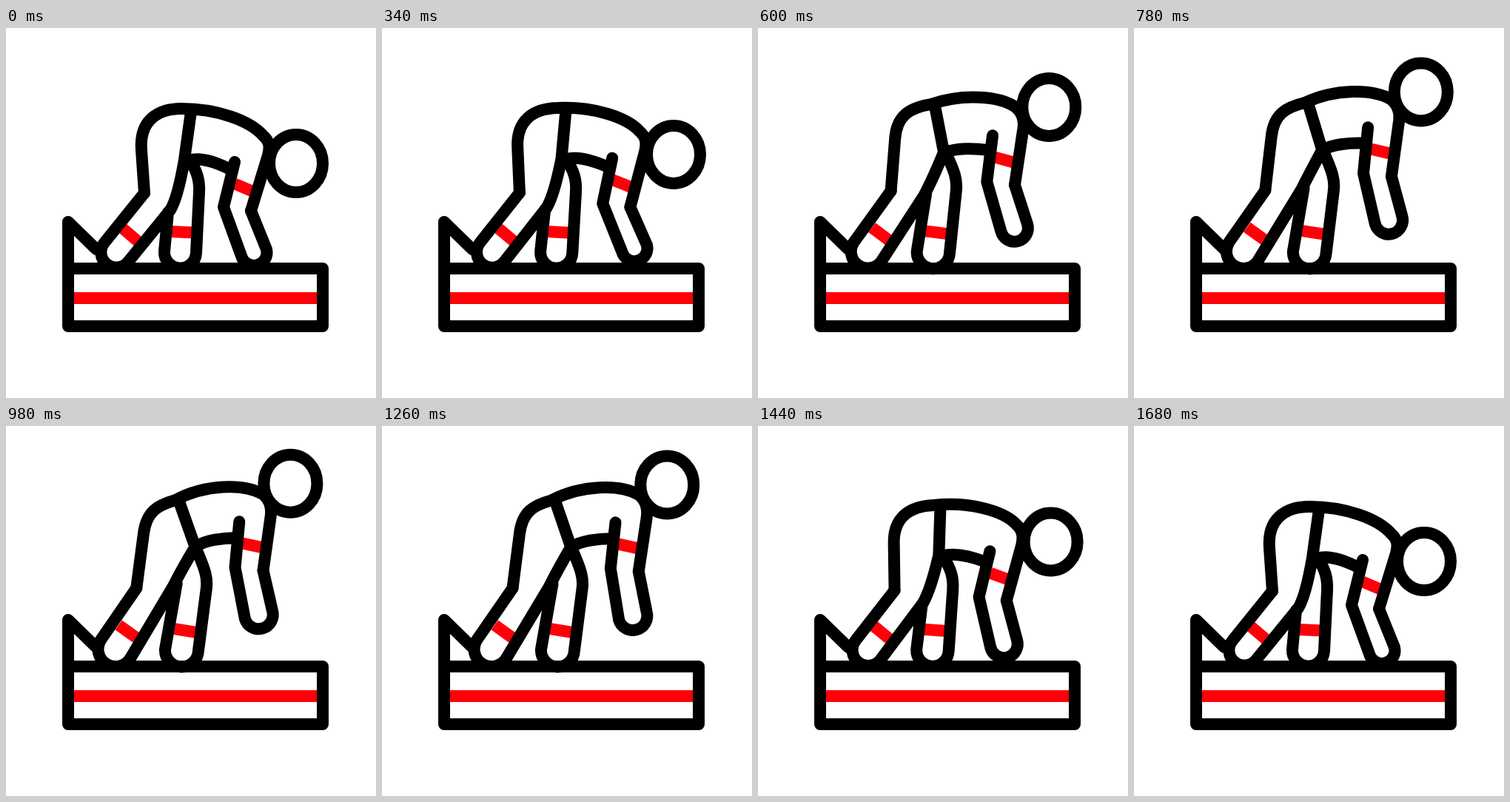
Write an HTML page that moves like this. It is 500 px wide and 500 px high and loops after 2 s.

```html
<!DOCTYPE html>
<html>
<head>
<meta charset="utf-8">
<title>Sprinter on the starting block</title>
<style>
  html, body { margin: 0; width: 100%; height: 100%; overflow: hidden; background: #fff; }
  svg { display: block; width: 100vw; height: 100vh; }
  path, ellipse { fill: none; stroke: #000; stroke-width: 16; stroke-linecap: round; stroke-linejoin: round; }
  .band { stroke: #ff0009; stroke-width: 16; stroke-linecap: butt; }
</style>
</head>
<body>
<svg viewBox="0 0 500 500">
  <path class="band" d="M84 365H428"/>
  <path class="band" id="bands"/>
  <path d="M84 325H428V403H84V262L122 299"/>
  <path id="legs"/>
  <path id="torso"/>
  <path id="arm"/>
  <ellipse id="head" rx="36" ry="39" style="fill:#fff"/>
</svg>
<script>
const LOOP = 2000;
const el = id => document.getElementById(id);
const clamp = x => Math.min(1, Math.max(0, x));

// cubic-bezier(.4, 0, .2, 1)
function ease(x) {
  let lo = 0, hi = 1;
  for (let i = 0; i < 24; i++) {
    const s = (lo + hi) / 2, r = 1 - s;
    if (1.2 * s * r * r + 0.6 * s * s * r + s ** 3 < x) lo = s; else hi = s;
  }
  return lo * lo * (3 - 2 * lo);
}

function draw(t) {
  const up = clamp((t - 160) / 1020);
  const down = clamp((t - 1200) / 480);
  const rise = ease(up) - ease(down);
  const arc = 4 * rise * (1 - rise);
  // the arm swings forward on the way up and back on the way down
  const swing = 3.2 * Math.sin(Math.PI * up ** 0.6) - 4.7 * Math.sin(Math.PI * down) ** 2;

  // a point moving from crouched to raised, optionally along a bowed path
  const bowed = (bx, by) => (x0, y0, x1, y1) =>
    [x0 + (x1 - x0) * rise + bx * arc, y0 + (y1 - y0) * rise + by * arc];
  const low = bowed(0, 0), high = bowed(4.5, 0), belly = bowed(2, 2);

  const knee = low(187, 223, 176, 219);
  const pelvis = low(241, 178, 256, 163);
  const groin = low(248, 179, 256, 163);
  const hip = bowed(4, 0)(237, 109, 228, 100);

  const elbow = bowed(4.5, 1), shift = 0.4 * swing;
  const shoulder = high(309, 181, 315, 128);
  const elbowIn = elbow(294 + shift, 242, 309 + shift, 190);
  const elbowOut = elbow(331 + shift, 247, 347 + shift, 194);
  const angle = 20 - 10.5 * rise + swing;
  const reach = ([x, y], len, degrees) => {
    const a = degrees * Math.PI / 180;
    return [x + len * Math.sin(a), y + len * Math.cos(a)];
  };

  const set = (id, d) => el(id).setAttribute("d", d);

  // arcs of radius 1 grow to half circles between their ends
  set("legs",
    `M${knee}L${low(133, 290, 128, 289)}A1 1 0 0 0 ${low(165, 316, 168, 314)}` +
    `L${low(222, 246, 226, 216)}Q${low(232, 230, 238, 192)} ${pelvis}L${low(250, 113, 234, 103)}` +
    `M${low(219, 249, 231, 212)}L${low(214, 302, 215, 302)}A1 1 0 0 0 ${low(257, 304, 260, 304)}` +
    `L${low(261, 222, 271, 220)}C${low(262, 205, 273, 206)} ${low(258, 192, 270, 195)} ${groin}`);

  set("torso",
    `M${knee}L${low(183, 165, 186, 145)}` +
    `C${low(180, 125, 190, 115)} ${low(205, 109, 205, 107)} ${hip}` +
    `C${high(285, 109, 268, 78)} ${high(330, 125, 320, 76)} ${bowed(1, -2)(348, 146, 347, 91)}` +
    `C${bowed(2, -1)(356, 153, 356, 99)} ${bowed(2, 0)(357, 160, 360, 109)} ${bowed(2, 0)(354, 172, 357, 125)}L${elbowOut}` +
    `M${groin}C${belly(262, 174, 268, 154)} ${belly(285, 182, 292, 150)} ${belly(303, 191, 313, 150)}`);

  set("arm",
    `M${shoulder}L${elbowIn}L${reach(elbowIn, 70, angle)}` +
    `A1 1 0 0 0 ${reach(elbowOut, 56, angle + 2)}L${elbowOut}`);

  set("bands",
    `M${low(158, 271, 152, 269)}L${low(179, 289, 176, 286)}` +
    `M${low(222, 275, 228, 274)}L${low(253, 276.5, 257, 279)}` +
    `M${high(309, 210.5, 318, 157)}L${high(335, 221.5, 347, 163)}`);

  const [hx, hy] = bowed(8, -4)(392, 183, 383.5, 75.5);
  el("head").setAttribute("cx", hx);
  el("head").setAttribute("cy", hy);
}

function tick() {
  draw(performance.now() % LOOP);
  requestAnimationFrame(tick);
}
tick();
</script>
</body>
</html>
```
